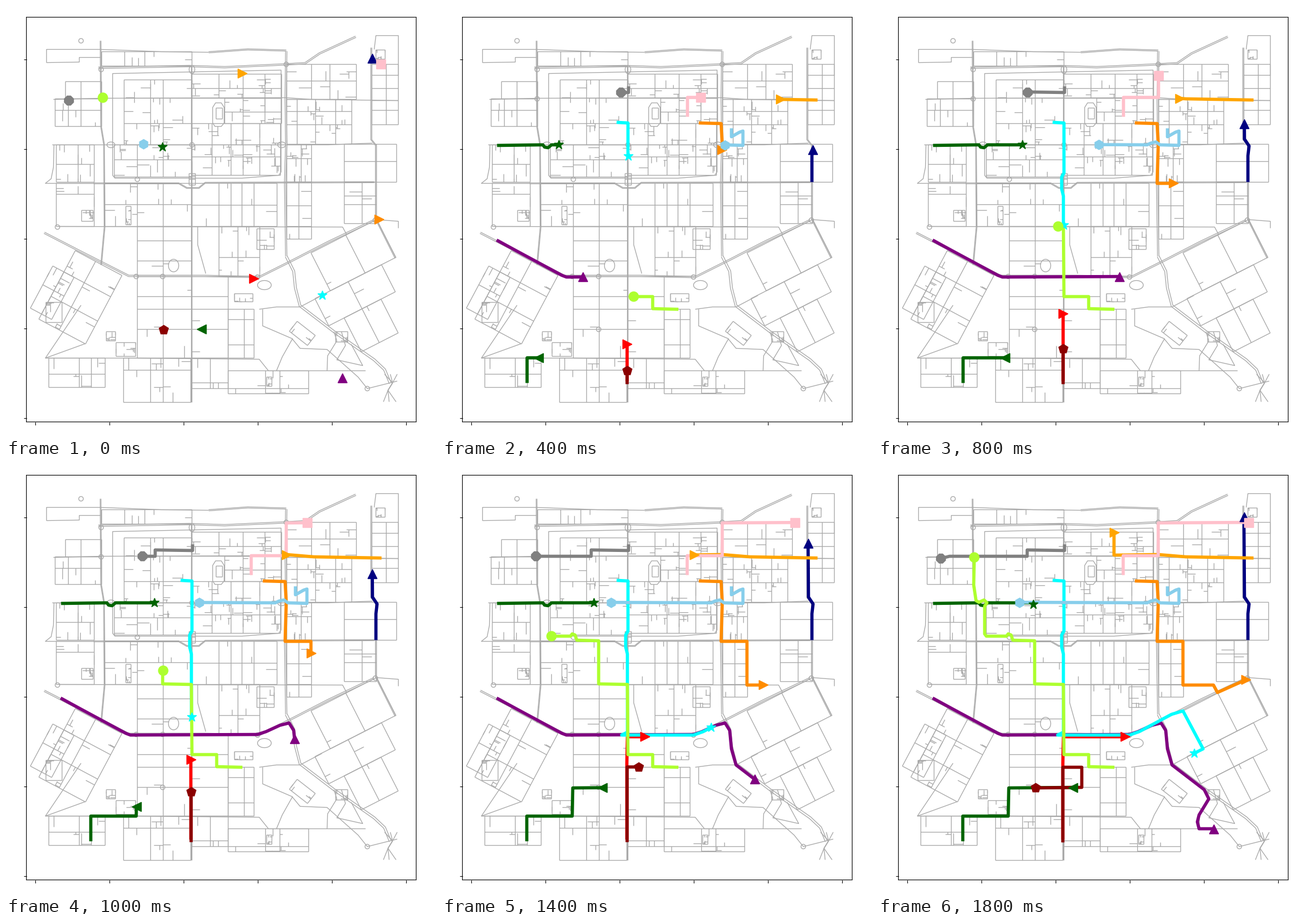
Recreate the animation shown at these times as a matplotlib script. Size 748 px wide and 748 px high, loop 2000 ms.

```python
import random
import numpy as np
import matplotlib.pyplot as plt
from matplotlib.animation import FuncAnimation
from matplotlib.collections import LineCollection

SIZE, DPI = 748, 100
LEFT, TOP, RIGHT, BOTTOM = 35, 19, 713, 723
FRAMES, STEP = 10, 200
KEYS = (1, 3, 5, 6, 8, 9)  # frames at which the routes' distances are given
random.seed(8)

# Data units are pixel indices, so every position falls on a pixel centre.
fig = plt.figure(figsize=(SIZE / DPI, SIZE / DPI), dpi=DPI, facecolor='white')
ax = fig.add_axes([(LEFT + .5) / SIZE, 1 - (BOTTOM + .5) / SIZE,
                   (RIGHT - LEFT) / SIZE, (BOTTOM - TOP) / SIZE])
ax.set(xlim=(LEFT, RIGHT), ylim=(BOTTOM, TOP),
       xticks=range(50, 700, 129), yticks=range(93, 720, 156))
ax.tick_params(labelbottom=False, labelleft=False)
for line in [*ax.spines.values(), *ax.xaxis.get_ticklines(), *ax.yaxis.get_ticklines()]:
    line.set_snap(False)

streets = []


def road(*xy):
    streets.append(np.reshape(xy, (-1, 2)))


def highway(*xy, gap=1.2):
    pts = np.reshape(xy, (-1, 2)).astype(float)
    normal = np.gradient(pts, axis=0)[:, ::-1] * (-1, 1)
    normal /= np.linalg.norm(normal, axis=1, keepdims=True)
    streets.extend([pts + gap * normal, pts - gap * normal])


def oval(x, y, rx, ry=None):
    a = np.linspace(0, 2 * np.pi, 25)
    streets.append(np.column_stack([x + rx * np.cos(a), y + (ry or rx) * np.sin(a)]))


def lanes(x0, y0, x1, y1, n, reach):
    """Grow short lanes at right angles from a block's sides and each other."""
    segs = [(x0, y0, x1, y0), (x0, y1, x1, y1), (x0, y0, x0, y1), (x1, y0, x1, y1)]
    for _ in range(n):
        xa, ya, xb, yb = random.choice(segs)
        t = random.uniform(.1, .9)
        x, y = xa + t * (xb - xa), ya + t * (yb - ya)
        d = random.choice((-1, 1)) * random.uniform(.4, 1.2) * reach
        if ya == yb:
            segs.append((x, y, x, np.clip(y + d, y0, y1)))
        else:
            segs.append((x, y, np.clip(x + d, x0, x1), y))
    return segs[4:]


def quarter(xs, ys, n, reach=18, origin=(0, 0), turn=0):
    """A grid of streets with n lanes in every block, turned about its origin."""
    segs = [(x, ys[0], x, ys[-1]) for x in xs] + [(xs[0], y, xs[-1], y) for y in ys]
    for x0, x1 in zip(xs, xs[1:]):
        for y0, y1 in zip(ys, ys[1:]):
            segs += lanes(x0, y0, x1, y1, n, reach)
    c, s = np.cos(np.radians(turn)), np.sin(np.radians(turn))
    streets.extend(np.reshape(segs, (-1, 2, 2)) @ [[c, s], [-s, c]] + origin)


# Ring roads and expressways
highway(160, 107, 318, 104, 380, 106, 487, 101, 520, 99, 545, 82, 608, 53)
highway(164, 60, 165, 210, 170, 240, 171, 384, 165, 450, gap=.7)
highway(487, 78, 486, 160, 487, 240, 485, 306, 487, 435)
highway(152, 308, 300, 308, 314, 316, 335, 316, 346, 307, 640, 306, gap=.8)
highway(66, 394, 130, 427, 213, 469, 345, 469, 440, 471, 500, 441, 560, 410, 640, 372)
highway(487, 435, 500, 461, 503, 490, 511, 521, 570, 566, 640, 615, 658, 632, 668, 656, gap=1.8)
highway(635, 72, 635, 232, 643, 242, 643, 370, 677, 438, gap=.9)
highway(352, 80, 420, 75, 487, 77, gap=1)
highway(322, 104, 322, 689, gap=.5)

# Old town and its wall road
road(82, 162, 165, 160, 487, 159, 530, 162, 682, 164)
road(80, 241, 560, 241, 637, 238)
road(185, 117, 185, 294, 189, 299, 410, 299, 474, 294, 478, 288, 478, 111, 185, 117)
quarter([204, 250, 272, 322], [128, 160, 204, 241], 5, 15)
quarter([187, 227, 272, 322], [241, 267, 297], 5)
quarter([322, 369, 411, 449, 478], [118, 143, 160], 3, 14)
quarter([379, 411, 449, 478], [160, 184, 204], 4, 14)
quarter([322, 357, 390, 411, 440, 476], [204, 241, 262, 294], 5, 14)

# West and north
road(70, 98, 70, 75, 164, 75, 270, 79, 352, 80)
road(70, 98, 127, 97, 127, 89, 164, 89)
road(83, 241, 82, 280, 78, 300, 68, 308, 152, 308)
quarter([165, 205, 240, 322], [79, 104], 2, 14)
quarter([102, 129, 165], [131, 161], 0)
quarter([84, 107, 129, 165], [161, 181, 209], 1)
quarter([86, 124, 152], [241, 275, 306], 4)
quarter([86, 152], [308, 327, 383], 7)

# North-east and east
road(640, 75, 643, 51, 682, 51, 682, 121)
road(643, 371, 682, 374, 682, 386)
quarter([635, 660, 681], [101, 120, 143, 164, 181, 206], 0)
quarter([487, 530, 562, 608], [101, 130, 162], 3)
quarter([487, 505, 537, 572, 600], [162, 183, 206, 240], 3, 14)
quarter([487, 512, 530], [241, 265, 306], 5, 14)
quarter([587, 643, 678], [240, 270, 306], 0)
quarter([587, 618, 643], [306, 330, 345, 378], 1)
quarter([487, 508, 530], [306, 347, 383, 405], 1)

# Middle and south
road(90, 383, 585, 384, 592, 397)
road(68, 612, 227, 612, 440, 614, 456, 634, 625, 634)
quarter([170, 227, 272, 322], [308, 345, 383], 3)
quarter([322, 369, 390, 409, 430, 470], [308, 346, 383], 1)
quarter([227, 272, 322], [383, 408, 443, 470], 1)
quarter([369, 402, 440], [383, 437, 470], 3, 12)
quarter([227, 272, 322, 385], [470, 505, 527, 562, 612], 1)
quarter([385, 413, 430], [527, 545, 589, 612], 0)
quarter([73, 126, 147, 171], [612, 640, 663], 2)
quarter([203, 250, 272, 320], [612, 633, 689], 3)
quarter([322, 354, 385], [612, 655, 665], 2)
quarter([385, 450, 475, 525], [634, 665, 674], 3, 12)
road(333, 383, 333, 415, 340, 440, 347, 465)

# Slanted districts
quarter([0, 40, 92], [0, 42, 90, 135], 3, 16, (120, 425), 28)
quarter([-22, 0, 20], [42, 79, 125], 4, 12, (120, 425), 28)
quarter([0, 68, 128], [0, 74], 2, 18, (530, 429), -27)
quarter([-30, 35, 100], [74, 127], 2, 18, (530, 429), -27)
quarter([0, 35, 72], [127, 193], 1, 18, (530, 429), -27)
quarter([0, 40], [0, 22], 8, 10, (506, 548), 38)
road(137, 587, 68, 612, 130, 520)
road(446, 527, 446, 556, 497, 578, 511, 595, 558, 597, 612, 645, 628, 665, 680, 652)
road(440, 527, 470, 523, 511, 523, 549, 503)
road(470, 634, 480, 610, 498, 578)
road(570, 566, 575, 582, 559, 608, 558, 634)
road(583, 566, 590, 590, 575, 615, 620, 625, 600, 588)
for x in (658, 668, 680):  # ramps
    road(x, 640, 672, 655, 664, 668, x - 2, 688)

# Packed courtyards: left, top, width, height
for x, y, w, h in ((173, 566, 16, 16), (190, 585, 34, 24), (435, 387, 30, 36), (207, 348, 9, 32),
                   (396, 500, 32, 14), (642, 76, 16, 16), (68, 515, 28, 35), (572, 566, 21, 18),
                   (452, 645, 9, 16), (130, 355, 20, 19)):
    quarter([x, x + w], [y, y + h], 12, min(w, h) / 2)

# Palace, stadium, lake and junctions
road(359, 203, 359, 176, 364, 168, 374, 168, 379, 176, 379, 203, 374, 209, 363, 209, 359, 203)
quarter([364, 375], [177, 196], 0)
quarter([317, 328], [291, 296, 301, 311], 0)
oval(291, 451, 9, 11)
oval(449, 485, 12, 8)
oval(323, 110, 5, 7)
for x in (182, 479):
    oval(x, 241, 7, 5)
for x, y in ((323, 241), (165, 161), (165, 110), (487, 101), (228, 301), (89, 384), (226, 470),
             (272, 470), (437, 471), (272, 562), (628, 665), (130, 60), (642, 372)):
    oval(x, y, 4)

ax.add_collection(LineCollection(streets, colors='#a9a9a9', linewidths=.95, zorder=1))

agents = []


def agent(color, marker, stops, *xy):
    """Follow the corners xy, having gone stops[k] pixels at frame KEYS[k]."""
    trail, = ax.plot([], [], color=color, lw=4, zorder=2)
    head, = ax.plot([], [], color=color, marker=marker, ms=12, ls='', zorder=3)
    agents.append((trail, head, stops, np.reshape(xy, (-1, 2))))


agent('darkgreen', '*', (67, 149, 163, 167, 171, 177),
      98, 242, 175, 241, 178, 245, 184, 246, 190, 241, 268, 241, 271, 245)
agent('darkgreen', '<', (30, 92, 137, 183, 259, 281),
      147, 653, 147, 612, 226, 612, 227, 563, 339, 562)
agent('purple', '^', (94, 233, 444, 471, 592, 662),
      97, 408, 130, 426, 208, 468, 216, 471, 437, 470, 452, 465, 476, 454, 492, 450,
      500, 463, 503, 495, 511, 523, 567, 566, 575, 582, 558, 610, 555, 622, 558, 634,
      583, 634, 584, 647)
agent('navy', '^', (19, 88, 115, 142, 194, 214),
      643, 303, 643, 260, 645, 243, 637, 231, 636, 91)
agent('orange', '>', (34, 89, 163, 180, 243, 280),
      650, 163, 535, 161, 487, 157, 410, 158, 410, 117)
agent('pink', 's', (33, 75, 186, 257, 295, 307),
      426, 190, 426, 159, 487, 159, 487, 102, 651, 101)
agent('darkorange', '>', (32, 131, 206, 257, 323, 383),
      449, 203, 485, 204, 487, 240, 485, 308, 530, 308, 530, 384, 583, 384, 590, 397, 648, 371)
agent('red', '>', (32, 93, 137, 167, 246, 284),
      321, 650, 321, 520, 322, 474, 430, 474)
agent('cyan', '*', (14, 136, 255, 353, 550, 613),
      306, 202, 323, 203, 323, 290, 319, 297, 319, 318, 322, 330, 322, 466, 312, 471,
      437, 471, 454, 465, 510, 435, 530, 429, 565, 495, 549, 503)
agent('greenyellow', 'o', (21, 173, 302, 365, 523, 605),
      408, 527, 366, 526, 366, 505, 323, 505, 322, 383, 272, 382, 272, 307, 234, 306,
      231, 297, 226, 295, 223, 299, 188, 299, 185, 295, 185, 247, 189, 241, 184, 236,
      175, 240, 170, 237, 166, 210, 167, 159)
agent('darkred', 'p', (9, 34, 85, 107, 190, 277),
      321, 655, 321, 527, 354, 527, 354, 562, 273, 563)
agent('gray', '8', (5, 39, 107, 143, 219, 235),
      324, 142, 324, 150, 259, 149, 259, 160, 124, 160, 108, 164)
agent('skyblue', 'h', (28, 154, 249, 283, 300, 339),
      503, 215, 503, 227, 517, 219, 523, 217, 523, 242, 490, 241, 483, 236, 474, 238,
      468, 241, 238, 240)


def cut(path, dist):
    """The part of the path within dist of its start."""
    gone = np.append(0, np.cumsum(np.hypot(*np.diff(path, axis=0).T)))
    tip = [np.interp(dist, gone, path[:, k]) for k in (0, 1)]
    return np.vstack([path[gone < dist], tip])


def draw(i):
    artists = []
    for trail, head, stops, path in agents:
        # The loop opens with every marker at its goal and no trail.
        pts = cut(path, np.interp(i, KEYS, stops)) if i else path[-1:]
        trail.set_data(*(pts.T if i else ([], [])))
        head.set_data(*pts[-1:].T)
        artists += [trail, head]
    return artists


anim = FuncAnimation(fig, draw, frames=FRAMES, interval=STEP, repeat=True, repeat_delay=0)
plt.show()
```
